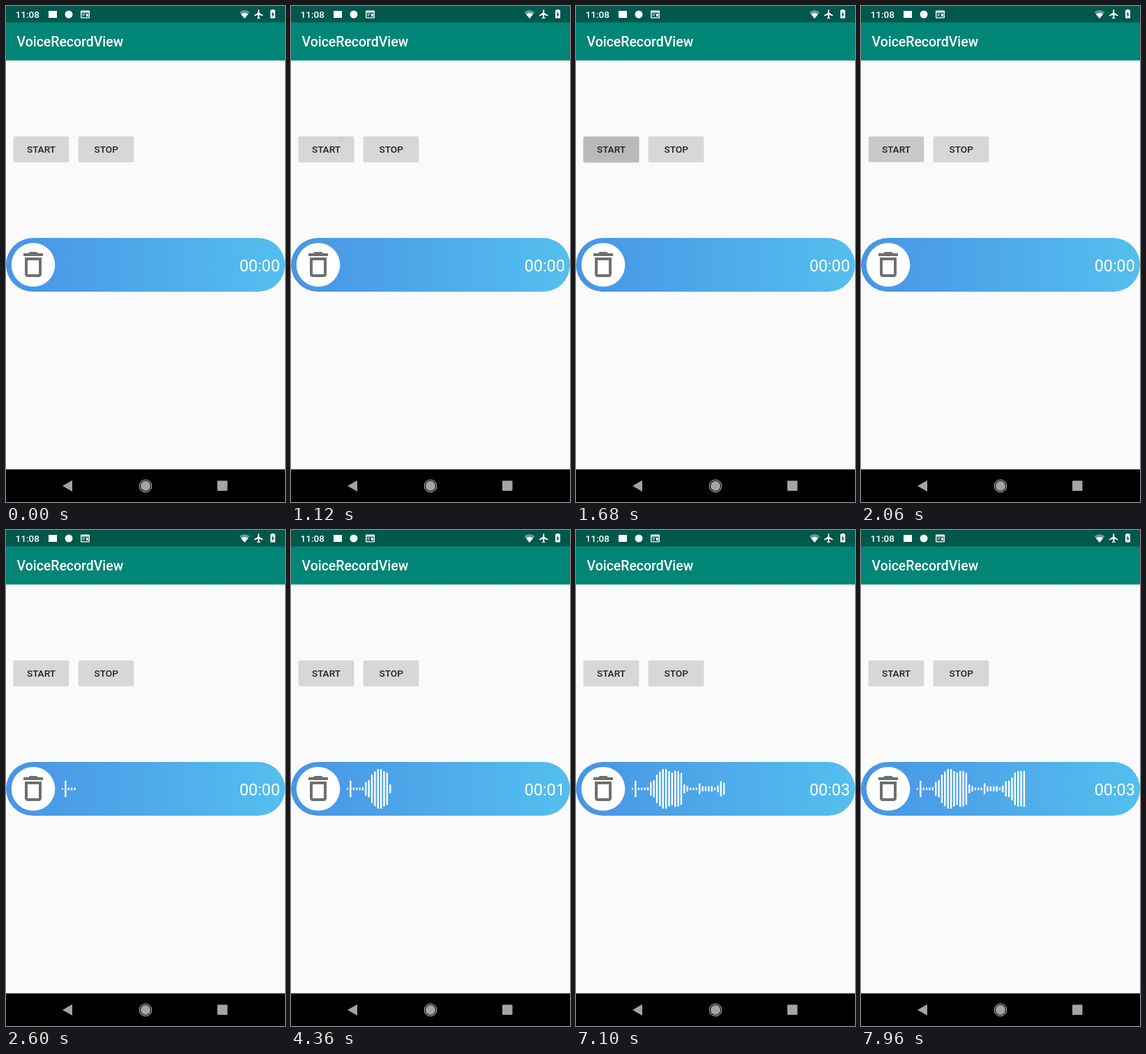
Write an HTML page that moves like this. It is 400 px wide and 710 px high and loops after 7.99 s.

```html
<!DOCTYPE html>
<html lang="en">
<head>
<meta charset="utf-8">
<title>VoiceRecordView</title>
<style>
  html, body { margin: 0; width: 100%; height: 100%; overflow: hidden; background: #fafafa; }
  svg { display: block; width: 400px; height: 710px; font-family: Roboto, sans-serif; }
  .label { font-size: 13.6px; font-weight: 500; }
</style>
</head>
<body>
<svg viewBox="0 0 400 710">
  <defs>
    <linearGradient id="sea">
      <stop offset="0" stop-color="#4894e5"/>
      <stop offset="1" stop-color="#54bfee"/>
    </linearGradient>
    <linearGradient id="shade" x2="0" y2="1">
      <stop offset="0" stop-opacity=".16"/>
      <stop offset="1" stop-opacity="0"/>
    </linearGradient>
    <clipPath id="startClip"><rect x="11" y="187" width="79" height="36" rx="2"/></clipPath>
  </defs>
  <rect width="400" height="710" fill="#fafafa"/>

  <!-- app bar and status bar -->
  <rect y="77.800" width="400" height="3" fill="url(#shade)"/>
  <rect y="23" width="400" height="54.800" fill="#008577"/>
  <rect width="400" height="23.500" fill="#00574b"/>
  <text x="15.500" y="57.500" font-size="19.450" font-weight="500" fill="#fff">VoiceRecordView</text>
  <g fill="#fff">
    <text class="label" x="13.500" y="17">11:08</text>
    <rect x="61" y="7" width="12" height="10"/>
    <circle cx="90" cy="12" r="5.500"/>
    <path fill-rule="evenodd" d="M108 6.500h11a1 1 0 0 1 1 1v9a1 1 0 0 1-1 1h-11a1 1 0 0 1-1-1v-9a1 1 0 0 1 1-1zM108.300 9.500v6.700h10.400v-6.700zM109.500 11h4v1h-4zM109.500 13.200h3v1h-3zM115 11h3v4h-3z"/>
    <path d="M334.500 9Q342 3 349.500 9L342 18z" opacity=".4"/>
    <path d="M337 11.800Q342 8 347 11.800L342 18z"/>
    <path transform="translate(354.700 4)scale(.65)" d="M21 16v-2l-8-5V3.500c0-.83-.67-1.500-1.500-1.500S10 2.670 10 3.500V9l-8 5v2l8-2.500V19l-2 1.500V22l3.500-1 3.500 1v-1.500L13 19v-5.500l8 2.500z"/>
    <path d="M380.500 6h-1.500v11.500h7V6h-1.500V5h-4z"/>
  </g>
  <path d="M383 8l-2.500 4.500h1.500v3.500l2.700-4.700h-1.700z" fill="#00574b"/>

  <!-- buttons -->
  <rect id="lift" x="10" y="187" width="81" height="38" rx="3"/>
  <g opacity=".1">
    <rect x="10.500" y="186.500" width="80" height="37.500" rx="2"/>
    <rect x="103.500" y="186.500" width="80" height="37.500" rx="2"/>
  </g>
  <g fill="#d6d7d7">
    <rect x="11" y="187" width="79" height="36" rx="2"/>
    <rect x="104" y="187" width="79" height="36" rx="2"/>
  </g>
  <circle id="ripple" cx="72" cy="190" clip-path="url(#startClip)"/>
  <g class="label" fill="#222" text-anchor="middle">
    <text x="50.500" y="210">START</text>
    <text x="143.700" y="210">STOP</text>
  </g>

  <!-- recorder -->
  <rect y="332" width="400" height="77" rx="38.500" fill="url(#sea)"/>
  <circle cx="39" cy="370.500" r="31.300" fill="#fff"/>
  <path transform="translate(15 346)scale(2)" fill="#6e706e" d="M6 19c0 1.100.9 2 2 2h8c1.100 0 2-.9 2-2V7H6v12zM8 9h8v10H8V9zm7.500-5l-1-1h-5l-1 1H5v2h14V4z"/>
  <g id="wave" stroke="#fff" stroke-width="2.400" stroke-linecap="round"></g>
  <text id="clock" x="334.700" y="379.500" font-size="23.350" fill="#fff">00:00</text>

  <!-- navigation bar -->
  <rect y="663.300" width="400" height="46.700"/>
  <g fill="#a4a4a4">
    <path d="M81 687l14-8v16z"/>
    <circle cx="200" cy="687" r="7"/>
    <circle cx="200" cy="687" r="8.700" fill="none" stroke="#a4a4a4" stroke-width="1.200"/>
    <rect x="303" y="679.500" width="14.500" height="14.500" rx="1"/>
  </g>
</svg>
<script>
const LOOP = 7990, HOLD = 100;
const holds = [1820, 2690, 4360, 5190, 6820]; // moments at which the screen rests
const levels = [2.5, 24, 4, 4, 4, 5, 20, 25, 41, 50, 57, 57, 51, 47, 52, 51, 46, 13,
  8, 4, 4, 4, 16, 8, 7, 8, 8, 4, 10, 22, 24, 33, 47, 51, 51, 52];
const get = id => document.getElementById(id);
const ramp = (t, a, b) => Math.min(1, Math.max(0, (t - a) / (b - a)));
const wave = get('wave'), clock = get('clock'), ripple = get('ripple'), lift = get('lift');

const bars = levels.map((level, i) => {
  const line = document.createElementNS('http://www.w3.org/2000/svg', 'line');
  const x = 81 + i * 4.37;
  line.setAttribute('x1', x);
  line.setAttribute('x2', x);
  wave.append(line);
  return { line, level, born: i < 5 ? 2070 + i * 115 : 1950 + i * 170 };
});

function draw(t) {
  for (const { line, level, born } of bars) {
    const half = Math.max(0.1, (level * ramp(t, born, born + 60) ** 2 - 2.4) / 2);
    line.setAttribute('y1', 370.5 - half);
    line.setAttribute('y2', 370.5 + half);
    line.style.display = t < born ? 'none' : '';
  }
  clock.textContent = '00:0' + Math.max(0, Math.floor((t - 1500) / 1700));

  ripple.setAttribute('r', 75 * ramp(t, 1100, 1480));
  ripple.setAttribute('opacity', 0.14 * ramp(t, 1090, 1200) * (1 - ramp(t, 1700, 2400)));
  lift.setAttribute('opacity', 0.14 * ramp(t, 1100, 1300) * (1 - ramp(t, 1600, 1900)));
}

function frame() {
  const t = performance.now() % LOOP;
  draw(holds.find(h => t >= h && t < h + HOLD) ?? t);
  requestAnimationFrame(frame);
}
frame();
</script>
</body>
</html>
```
